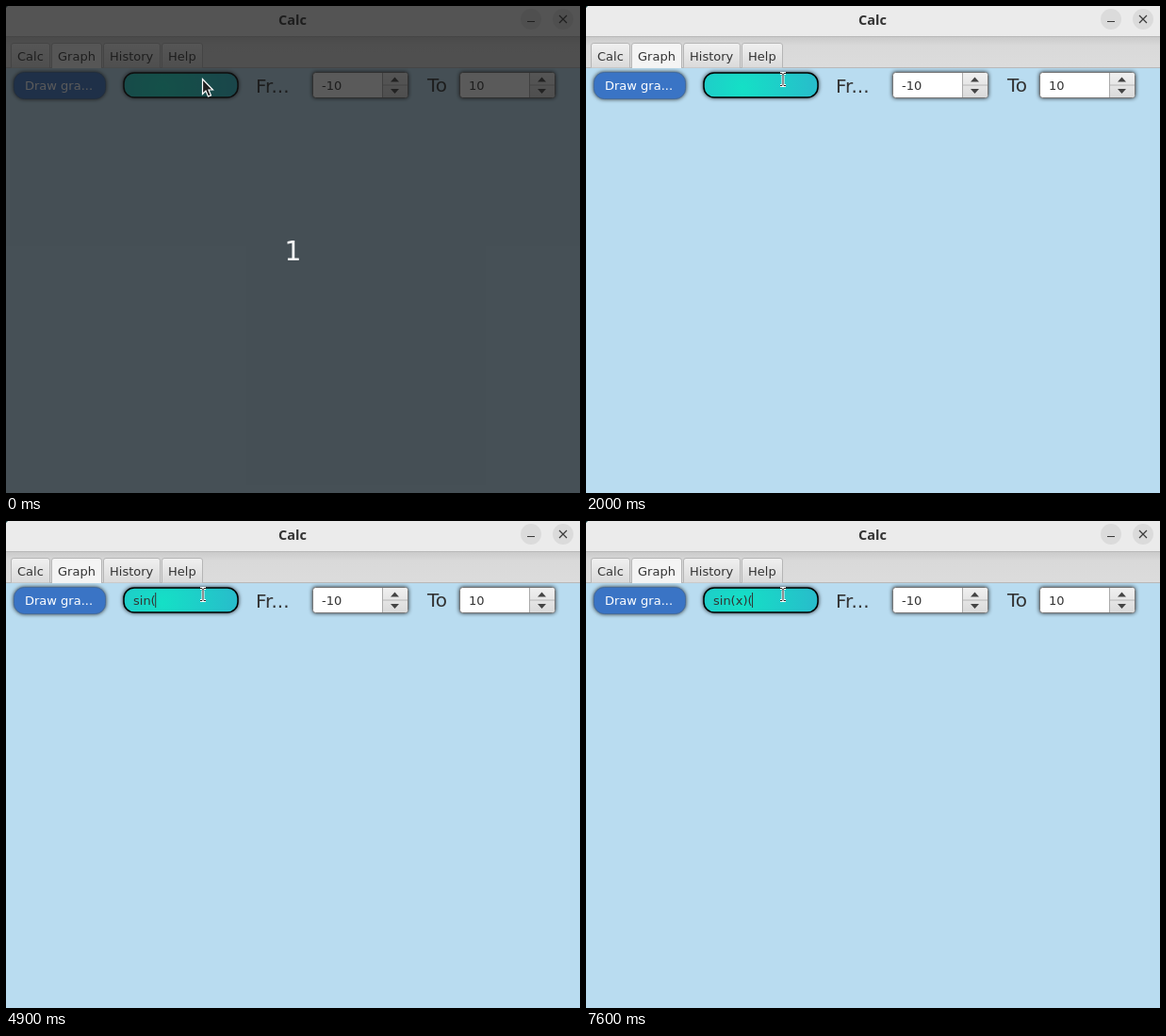
Recreate the animation shown at these times as an HTML page. Size 609 px wide and 517 px high, loop 8000 ms.

```html
<!DOCTYPE html>
<html lang="en">
<head>
<meta charset="utf-8">
<title>Calc</title>
<style>
html, body { margin: 0; width: 100%; height: 100%; overflow: hidden; background: #b9dcf0; }
svg { display: block; }
text { font: 13px "DejaVu Sans", sans-serif; fill: #333; white-space: pre; }
.title { font: bold 14.5px "Noto Sans", sans-serif; }
.label { font-size: 20px; }
.count { font-size: 28px; fill: #fff; }
.raised { filter: drop-shadow(0 0 2px rgba(0, 0, 0, .8)); }
</style>
</head>
<body>
<svg width="609" height="517" viewBox="0 0 609 517">
  <defs>
    <linearGradient id="header" x2="0" y2="1">
      <stop stop-color="#c9c9c9"/><stop offset=".3" stop-color="#d9d9d9"/><stop offset="1" stop-color="#dcdcdc"/>
    </linearGradient>
    <linearGradient id="grey" x2="0" y2="1">
      <stop stop-color="#f0f0f0"/><stop offset="1" stop-color="#dadada"/>
    </linearGradient>
    <radialGradient id="teal" gradientUnits="userSpaceOnUse" cx="166" cy="87" r="84">
      <stop stop-color="#14e0c6"/><stop offset="1" stop-color="#29bacb"/>
    </radialGradient>
    <g id="spinner">
      <rect class="raised" x=".5" y=".5" width="101" height="27" rx="3" fill="#fff" stroke="#777"/>
      <path d="M75 1h24q2 0 2 2v10.500h-26z M75 14.500h26v10.500q0 2-2 2h-24z" fill="url(#grey)"/>
      <path d="M74.500 1v26M75 14h26" stroke="#aaa" fill="none"/>
      <path d="M83 10.500l4.500-5 4.500 5zM83 18l4.500 5 4.500-5z" fill="#444"/>
    </g>
  </defs>

  <rect width="609" height="517" fill="#b9dcf0"/>
  <rect width="609" height="33" fill="#ebebeb"/>
  <path d="M0 0h2l-2 2z" fill="#1d4a4a"/>
  <text class="title" x="304" y="20" text-anchor="middle">Calc</text>
  <g fill="#dbdbdb"><circle cx="557" cy="14" r="11"/><circle cx="591" cy="14" r="11"/></g>
  <path d="M553 16.500h8M587 10l8 8m0-8l-8 8" stroke="#3a3a3a" stroke-width="1.200"/>

  <rect y="32" width="609" height="34" fill="url(#header)"/>
  <path d="M0 32.500h609M0 65.500h609" stroke="#b8b8b8"/>
  <g id="tabs"></g>

  <rect class="raised" x="8.500" y="70.500" width="97" height="28" rx="11" fill="#3a74c5" stroke="#416a9f"/>
  <text x="20" y="89" style="fill:#fff">Draw gra...</text>

  <rect class="raised" x="125" y="71" width="121" height="26" rx="11" fill="url(#teal)" stroke="#000" stroke-width="1.500"/>
  <text id="formula" x="135" y="89"></text>
  <rect id="caret" y="76" width="1" height="16" fill="#333"/>

  <text class="label" x="265" y="92">Fr...</text>
  <use href="#spinner" x="325" y="70"/>
  <text x="335" y="89">-10</text>
  <text class="label" x="447" y="91">To</text>
  <use href="#spinner" x="481" y="70"/>
  <text x="491" y="89">10</text>

  <g id="beam" fill="none">
    <path d="M206 71.500h2l1 1 1-1h2M209 72v11M206 84.500h2l1-1 1 1h2" stroke="#fff" stroke-width="3"/>
    <path d="M206 71.500h2l1 1 1-1h2M209 72v11M206 84.500h2l1-1 1 1h2" stroke="#222"/>
  </g>

  <g id="countdown">
    <rect width="609" height="517" fill="#141414" fill-opacity=".7"/>
    <text class="count" x="304.500" y="270" text-anchor="middle">1</text>
    <path d="M208.500 77.500v16l3.500-3.500 2.500 6 3-1.200-2.500-5.800h4.500z" fill="#222" stroke="#fff" stroke-width="1.200"/>
  </g>
</svg>
<script>
const LOOP = 8000, COUNTDOWN_END = 100, BLINK = 500;
const FORMULA = "sin(x)(";
// [time of key press, characters entered so far]; modifier keys only restart the blink
const KEYS = [[-500, 0], [3500, 1], [3800, 2], [4100, 3], [4500, 3], [4900, 4],
              [5500, 5], [5900, 6], [7500, 6], [7600, 7]];
const TABS = [["Calc", 5, 42], ["Graph", 48, 54], ["History", 103, 61], ["Help", 165, 44]];

const byId = id => document.getElementById(id);
const show = (node, on) => node.setAttribute("visibility", on ? "visible" : "hidden");
const [formula, caret, beam, countdown] = ["formula", "caret", "beam", "countdown"].map(byId);

byId("tabs").innerHTML = TABS.map(([name, x, width]) => {
  const active = name === "Graph";
  return `<path d="M${x + .5} ${active ? 66 : 65.5}V42q0-2.500 2.500-2.500h${width - 6}q2.500 0 2.500 2.500V${active ? 66 : 65.5}"
    fill="${active ? "#f4f4f4" : "url(#grey)"}" stroke="#b5b5b5"/><text x="${x + 7}" y="58">${name}</text>`;
}).join("");

function draw(now) {
  const t = now % LOOP;
  const [pressed, length] = KEYS.findLast(key => key[0] <= t);
  const typed = FORMULA.slice(0, length);
  if (formula.textContent !== typed) formula.textContent = typed;
  caret.setAttribute("x", 134.5 + (length ? formula.getComputedTextLength() : 0));
  show(caret, (t - pressed) % (2 * BLINK) < BLINK);
  show(countdown, t < COUNTDOWN_END);
  show(beam, t >= COUNTDOWN_END);
  requestAnimationFrame(draw);
}
requestAnimationFrame(draw);
</script>
</body>
</html>
```
